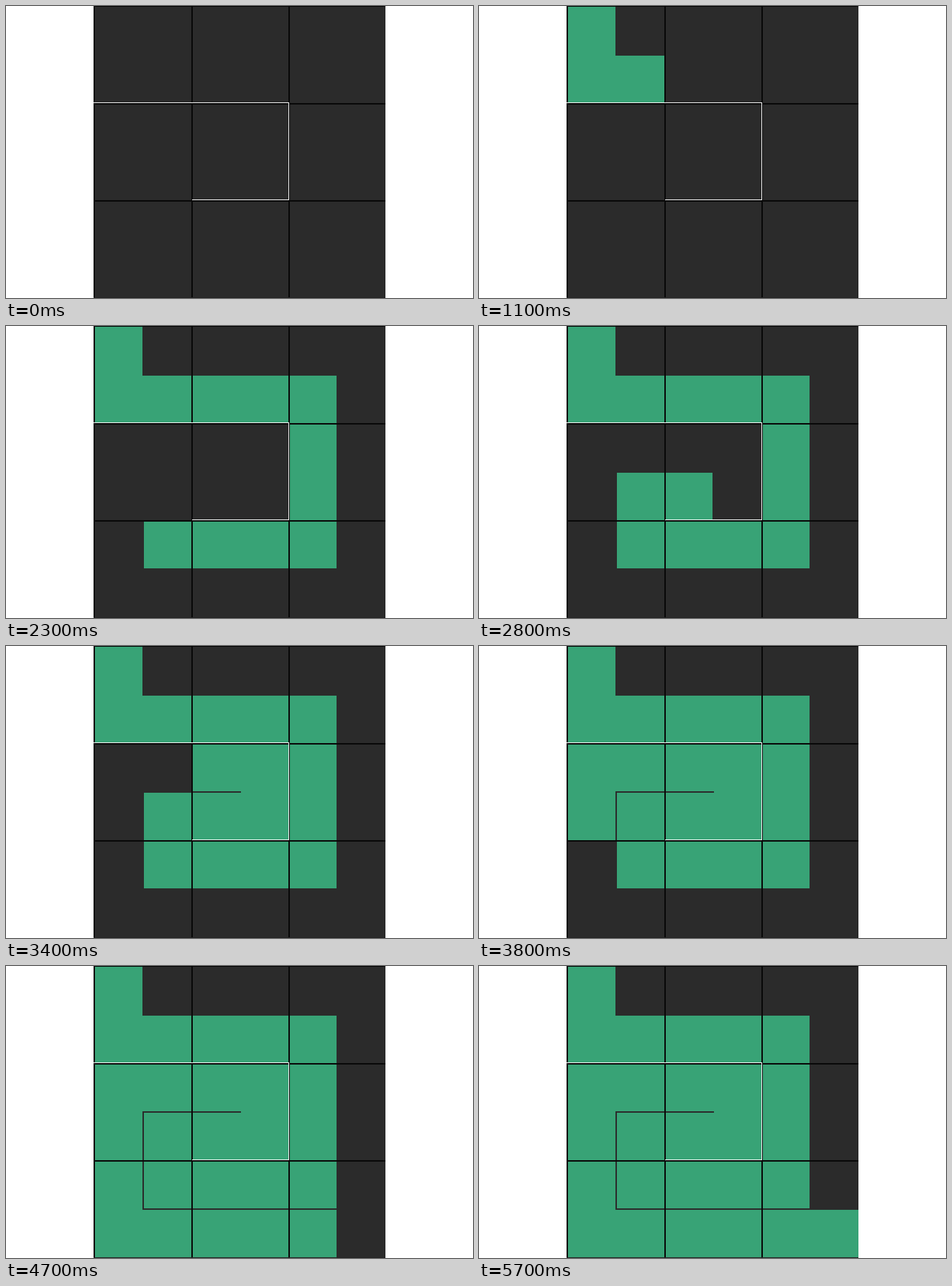
An HTML page with a canvas for the animation above (6000 ms loop, 640x400 px).

```html
<!DOCTYPE html>
<html lang="en">
<head>
<meta charset="utf-8">
<title>Grid coverage path</title>
<style>
  html, body { margin: 0; width: 100%; height: 100%; overflow: hidden; background: #fff; }
  canvas { display: block; }
</style>
</head>
<body>
<canvas id="stage" width="640" height="400"></canvas>
<script>
const ctx = document.getElementById('stage').getContext('2d');
const LOOP = 6000, STEP = 66.6, CELL = 65;

// The walk through the half-cells, starting in the top left corner.
const moves = { U: [0, -1], D: [0, 1], L: [-1, 0], R: [1, 0] };
const path = [[0, 0]];
for (const m of 'DRRRRDDDLLLURRULLLDDDRRRRR') {
  const [col, row] = path[path.length - 1];
  path.push([col + moves[m][0], row + moves[m][1]]);
}

// Moment each half-cell is filled, in tenths of a second.
const fillTimes = [5, 8, 10, 12, 14, 15, 16, 17, 18, 20, 22, 23, 26, 28, 29,
  31, 33, 35, 36, 38, 40, 41, 43, 45, 46, 47, 48];

function rect(color, x, y, w, h) {
  ctx.fillStyle = color;
  ctx.fillRect(x, y, w, h);
}

const left = col => Math.round(122 + STEP * col);
const top_ = row => Math.round(1 + STEP * row);

// Fills a half-cell together with the gap to the one before it.
function fillLink([c0, r0], [c1, r1]) {
  const x = left(Math.min(c0, c1)), y = top_(Math.min(r0, r1));
  rect('#38a376', x, y,
    left(Math.max(c0, c1)) + CELL - x, top_(Math.max(r0, r1)) + CELL - y);
}

function drawGrid() {
  for (const x of [254, 387]) rect('#080808', x, 0, 2, 400);
  for (const y of [133, 266]) rect('#080808', 120, y, 400, 2);
  rect('#000', 120, 0, 2, 400);
  rect('#000', 120, 0, 400, 1);
  rect('#222', 120, 399, 400, 1);
  rect('#f4f4f4', 120, 132, 267, 1);
  rect('#f4f4f4', 387, 132, 1, 134);
  rect('#f4f4f4', 255, 265, 133, 1);
}

function draw(now) {
  const t = now % LOOP;
  rect('#fff', 0, 0, 640, 400);
  rect('#2b2b2b', 120, 0, 400, 400);
  path.forEach((cell, i) => {
    if (t >= fillTimes[i] * 100) fillLink(path[Math.max(0, i - 1)], cell);
  });
  drawGrid();
}

const start = performance.now();
function tick() {
  draw(performance.now() - start);
  requestAnimationFrame(tick);
}
tick();
</script>
</body>
</html>
```
